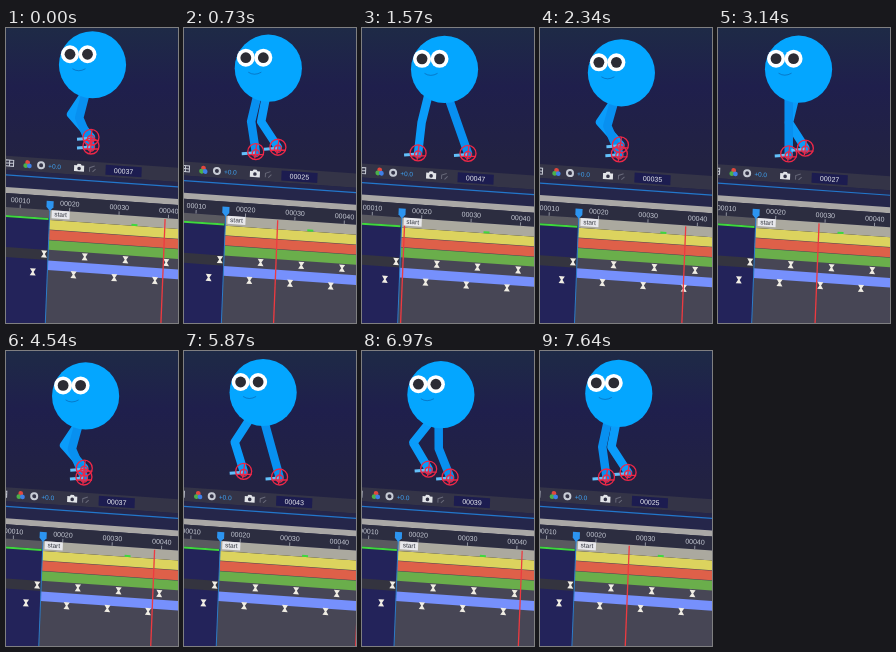
These frames come from a looping animation (172x295 px, 7.67 s). An HTML page:

```html
<!DOCTYPE html>
<html lang="en">
<head>
<meta charset="utf-8">
<title>Walk cycle preview</title>
<style>
  html, body { margin: 0; width: 100%; height: 100%; overflow: hidden; background: #20204c; }
  svg { display: block; width: 100vw; height: 100vh; }
  text { font: 7px "Liberation Sans", Arial, sans-serif; fill: #c8ccd6; text-anchor: middle; }
  .leg { fill: none; stroke-width: 8.5; stroke-linejoin: round; stroke-linecap: round; }
  .ctrl { fill: none; stroke: #ee2848; stroke-width: 1.3; }
  .icon { fill: none; stroke: #c8ccd6; }
</style>
</head>
<body>
<svg viewBox="0 0 172 295" preserveAspectRatio="none">
  <defs>
    <linearGradient id="night" x2="0" y2="1">
      <stop offset="0" stop-color="#1e2a46"/>
      <stop offset=".2" stop-color="#1f1f4c"/>
      <stop offset=".45" stop-color="#222242"/>
    </linearGradient>
    <path id="key" d="M-3-3.5H3L.8 0 3 3.5H-3L-.8 0Z" fill="#f0ede4"/>
    <g id="foot">
      <path d="M-14 2L0 1" stroke="#62c0fa" stroke-width="3"/>
      <g class="ctrl">
        <circle r="8"/>
        <circle r="3.5" cy="1.5"/>
        <path d="M-8 3H8M1-8L-1 7"/>
      </g>
    </g>
    <g id="eye">
      <circle r="9" fill="#fff"/>
      <circle r="5.4" fill="#2c2c34"/>
    </g>
  </defs>

  <rect width="172" height="295" fill="url(#night)"/>

  <g id="camera">
    <path id="legB" class="leg" stroke="#0a9cfa"/>
    <path id="legA" class="leg" stroke="#0890f0"/>
    <use id="footB" href="#foot"/>
    <use id="footA" href="#foot"/>
    <g id="body">
      <circle r="33.6" fill="#04a6ff"/>
      <path d="M-20 4Q-14 8-7 4" fill="none" stroke="#0b4f96" opacity=".5"/>
      <use href="#eye" x="-22.5" y="-10.5"/>
      <use href="#eye" x="-5" y="-10.5"/>
    </g>

    <g transform="matrix(1 .07 -.04 1 0 0)">
      <rect x="-70" y="-47" width="240" height="14" fill="#343447"/>
      <rect x="-70" y="-33" width="240" height="22" fill="#25264a"/>
      <path d="M-70-28H170" stroke="#2277cc" stroke-width="1.2"/>

      <g transform="translate(0 -40)">
        <path class="icon" d="M-46-3h8v6h-8zM-42-3v6M-46 0h8"/>
        <circle cx="-24" cy="-1.8" r="2.4" fill="#e2483f"/>
        <circle cx="-25.8" cy="1.4" r="2.4" fill="#4cb04a"/>
        <circle cx="-22.2" cy="1.4" r="2.4" fill="#3f7fe8"/>
        <circle class="icon" cx="-10.5" r="3" stroke-width="2"/>
        <text x="3" y="2.5" style="fill:#3fa4f6;font-size:6.5px">+0.0</text>
        <path d="M22.5-2.5H25l1-1.500h3l1 1.500h2.500v6h-10z" fill="#e2e4e8"/>
        <circle cx="27.500" cy=".5" r="1.800" fill="#343447"/>
        <path class="icon" d="M38 3V-1l5-2M41 3l3-3" opacity=".35"/>
        <rect x="54" y="-5" width="36" height="10" fill="#1c1c50"/>
        <text id="count" x="72" y="2.500" style="fill:#eceef2"></text>
      </g>

      <rect x="-70" y="-16" width="240" height="6" fill="#aaa8a6"/>
      <rect x="-70" y="-10" width="240" height="14" fill="#2c2d40"/>
      <rect x="-70" y="4" width="70" height="8" fill="#5a5a60"/>
      <rect y="4" width="170" height="10" fill="#aba99f"/>
      <g id="ruler"></g>

      <rect x="-70" y="14" width="70" height="150" fill="#23235a"/>
      <rect x="-70" y="44" width="70" height="10" fill="#34343f"/>
      <rect y="14" width="170" height="150" fill="#474655"/>
      <g id="bars"></g>
      <path d="M-70 13H-1M82 13H88" stroke="#3fd83d" stroke-width="2"/>
      <g id="keys"></g>

      <path d="M0 4V140" stroke="#2c7cc8"/>
      <path id="head" d="M0 5V140" stroke="#ee3a40" stroke-width="1.300"/>
      <path d="M-3.500-5H3.500V1L0 5-3.500 1Z" fill="#2c94f0"/>
      <rect x="2" y="4" width="18" height="8" fill="#e8e8ec"/>
      <text x="11" y="10" style="fill:#33363f;font-size:6.500px">start</text>
    </g>
  </g>
</svg>

<script>
const LOOP = 7.67, FIRST = 16, SPAN = 32, STEP = 4.94;
const THIGH = 27, SHIN = 30.5, GROUND = -60, CROSSING = .7;
const { cos, sin, sqrt, exp, floor, hypot, min, PI } = Math;
const $ = id => document.getElementById(id);

const wrap = f => FIRST + (f - FIRST) % SPAN;
const pad = n => String(n).padStart(5, "0");
const move = (id, x, y) => $(id).setAttribute("transform", `translate(${x} ${y})`);

// Steady playback whose speed drifts slowly.
const playhead = t => 37.9 + 28.05 * t + 1.9 * cos(PI / 3 * (t - 5.3));

// Distance between the feet, 1 to -1, slowing down where they pass.
function stride(k) {
  const d = CROSSING - k;
  return d > 0 ? (d / CROSSING) ** 1.5 : -sqrt(-d / (1 - CROSSING));
}

// Two-bone leg with the knee bent to the left.
function drawLeg(side, hipY, x, y) {
  const hipX = 36 + (x - 41) * .4;
  const dx = x - hipX, dy = y - hipY;
  const reach = min(hypot(dx, dy), THIGH + SHIN);
  const along = (THIGH ** 2 - SHIN ** 2 + reach ** 2) / (2 * reach);
  const bend = sqrt(THIGH ** 2 - along ** 2);
  const kneeX = hipX + (dx * along - dy * bend) / reach;
  const kneeY = hipY + (dy * along + dx * bend) / reach;
  $("leg" + side).setAttribute("d", `M${hipX} ${hipY}L${kneeX} ${kneeY}L${x} ${y}`);
  move("foot" + side, x, y);
}

function draw(t) {
  const head = playhead(t);
  move("camera", 36 + 8 * exp(-t / 2.3), 186 - 8 * exp(-t / .6));
  move("head", (wrap(head) - FIRST) * STEP, 0);

  const shown = wrap(head - 1);
  $("count").textContent = pad(floor((shown - 1) / 2) * 2 + 1);

  const k = (shown - FIRST) / SPAN;
  const bodyY = -143 + 2 * cos((shown - 37) * PI / 8);
  const half = 25.5 * stride(k);
  const lift = 9 * sin(PI * k ** 1.5);
  move("body", 42.5, bodyY);
  drawLeg("A", bodyY + 27, 41 - half, GROUND);
  drawLeg("B", bodyY + 27, 41 + half, GROUND - lift);
}

$("ruler").innerHTML = [10, 20, 30, 40].map(f => {
  const u = (f - FIRST) * STEP;
  return `<text x="${u}" y="-1.200">${pad(f)}</text><path d="M${u} .5v3.500" stroke="#9094a0"/>`;
}).join("");

$("bars").innerHTML = ["#dcd35e", "#de6049", "#6aae4b", "", "#7690fc"].map((fill, i) => fill &&
  `<rect y="${14 + i * 10.100}" width="170" height="9.600" fill="${fill}"/>`).join("");

for (let row = 0; row < 2; row++) {
  for (let i = 0; i < 4; i++) {
    $("keys").innerHTML += `<use href="#key" x="${-4 + i * 40.7 - row * 10.5}" y="${48.3 + row * 18.6}"/>`;
  }
}

const begin = performance.now();
function tick() {
  draw((performance.now() - begin) / 1000 % LOOP);
  requestAnimationFrame(tick);
}
tick();
</script>
</body>
</html>
```
